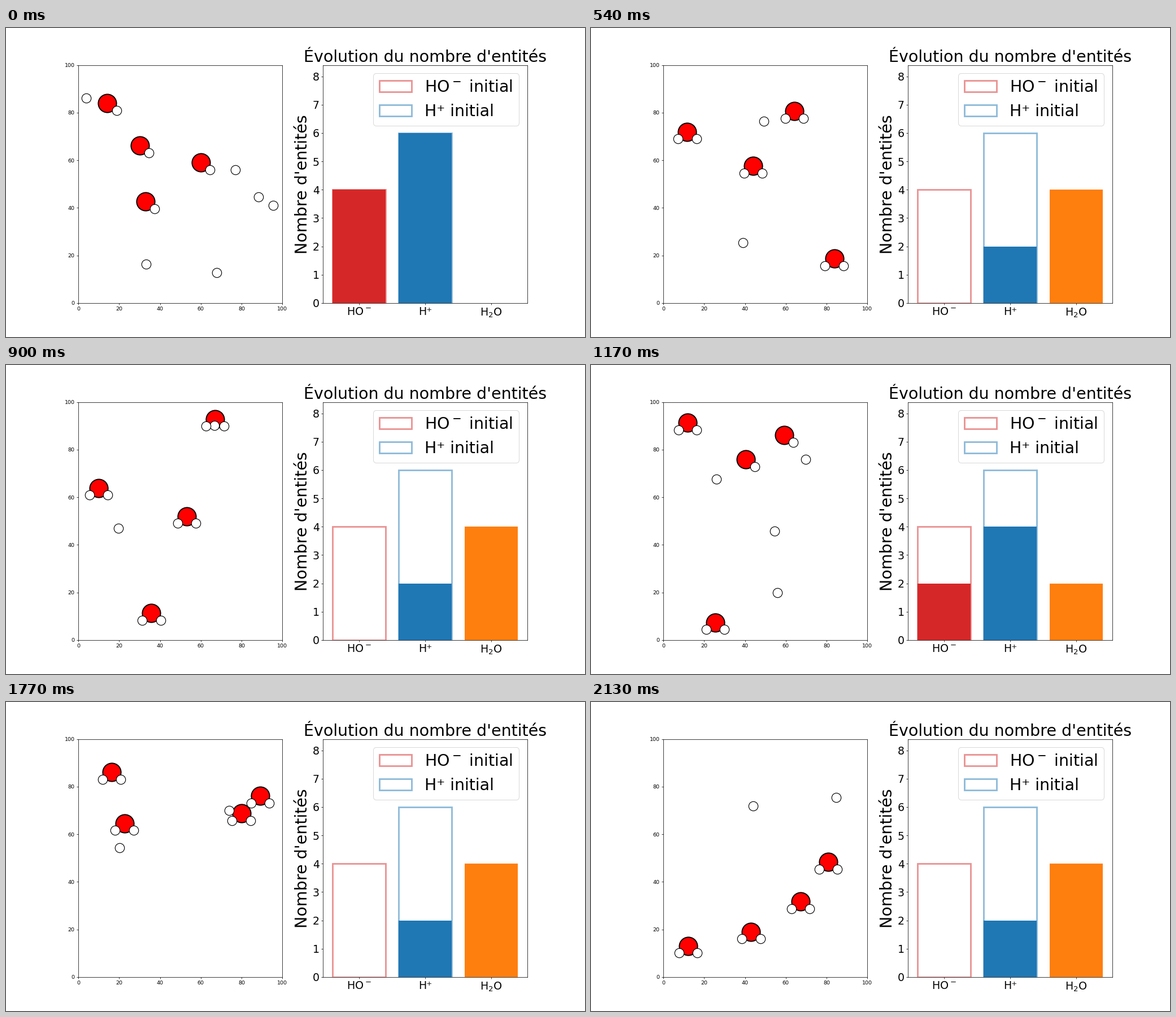
Animation, 1025 px wide and 547 px high, one loop 2160 ms. Source, as a matplotlib script:

```python
import numpy as np
import matplotlib.pyplot as plt
from matplotlib.animation import FuncAnimation

W, H = 1025, 547
DPI = W / 15
FRAMES, STEP = 72, 30
RUN = FRAMES // 2

O_WALLS = (7, 94)
H_WALLS = (3, 98)
LEFT, RIGHT = np.array([-4.5, -3]), np.array([4.5, -3])


class Run:
    """One reaction: oxygens and spare protons as (x, y, vx, vy), and the
    start points of the protons that the oxygens capture in turn."""

    def __init__(self, oxygens, spare, caught):
        self.oxygens = np.array(oxygens)
        self.spare = np.array(spare)
        self.caught = np.array(caught)


RUNS = [
    Run(oxygens=[(14.2, 84.0, -0.14, -0.67), (32.8, 42.6, -5.7, -1.33),
                 (60.1, 59.1, 0.23, 1.2), (30.1, 66.1, 0.77, -0.47)],
        spare=[(77.0, 55.9, -6.68, 1.14), (67.7, 12.8, -1.6, -1.79)],
        caught=[(3.8, 86.1), (33.1, 16.3), (88.3, 44.6), (95.4, 41.1)]),
    Run(oxygens=[(12.3, 74.8, -3.4, 7.3), (30.5, 24.0, -1.7, -5.8),
                 (54.7, 74.3, 1.5, 9.2), (43.9, 89.9, -1.2, 7.4)],
        spare=[(31.9, 85.0, -2.0, -5.8), (53.1, 32.5, 0.9, -4.2)],
        caught=[(6, 70), (14, 30), (76.6, 98), (62.8, 51.2)]),
]


def drift(body, t, walls):
    """Constant velocity, bouncing between two walls on each axis."""
    lo, hi = walls
    span = hi - lo
    p = body[:2] + body[2:] * t
    return hi - np.abs((p - lo) % (2 * span) - span)


def state(k):
    """Oxygen positions, proton positions and the count of each entity."""
    run, t = RUNS[k // RUN], k % RUN
    oxygens, protons, bound = [], [], []
    water = 0
    for p in run.spare:
        protons.append(drift(p, t, H_WALLS))
    for i, body in enumerate(run.oxygens):
        pos = drift(body, t, O_WALLS)
        oxygens.append(pos)
        bound.append(pos + RIGHT)
        hit = 2 ** (i + 1) - 1  # captures grow rarer
        if t >= hit:
            bound.append(pos + LEFT)
            water += 1
        else:
            start, meet = run.caught[i], drift(body, hit, O_WALLS) + LEFT
            protons.append(start + (meet - start) * t / hit)
    return oxygens, protons + bound, (4 - water, 6 - water, water)


fig, (box, chart) = plt.subplots(
    1, 2, figsize=((W + 1e-6) / DPI, (H + 1e-6) / DPI), dpi=DPI)
fig.subplots_adjust(left=0.125, right=0.9, bottom=0.11, top=0.88, wspace=0.2)

box.set(xlim=(0, 100), ylim=(0, 100))
big = box.scatter([], [], s=34 ** 2, c="red", edgecolors="black",
                  linewidths=2, zorder=2)
small = box.scatter([], [], s=300, c="white", edgecolors="black",
                    linewidths=1.2, zorder=3)

names = ["HO$^-$", "H⁺", "H$_2$O"]
colors = ["tab:red", "tab:blue", "tab:orange"]
for i, n in enumerate([4, 6]):
    chart.bar(i, n, facecolor="none", edgecolor=colors[i], linewidth=3,
              alpha=0.5, label=names[i] + " initial")
bars = chart.bar(range(3), 0, color=colors)
chart.set(xlim=(-0.54, 2.54), ylim=(0, 8.4))
chart.set_xticks(range(3), names)
chart.set_yticks(range(9))
chart.tick_params(labelsize=20)
chart.set_title("Évolution du nombre d'entités", fontsize=30)
chart.set_ylabel("Nombre d'entités", fontsize=30)
chart.legend(fontsize=30, loc="upper right")


def draw(k):
    oxygens, protons, counts = state(k)
    big.set_offsets(oxygens)
    small.set_offsets(protons)
    for bar, n in zip(bars, counts):
        bar.set_height(n)
    return [big, small, *bars]


anim = FuncAnimation(fig, draw, frames=FRAMES, interval=STEP,
                     init_func=lambda: draw(0), repeat=True, repeat_delay=0)
plt.show()
```
